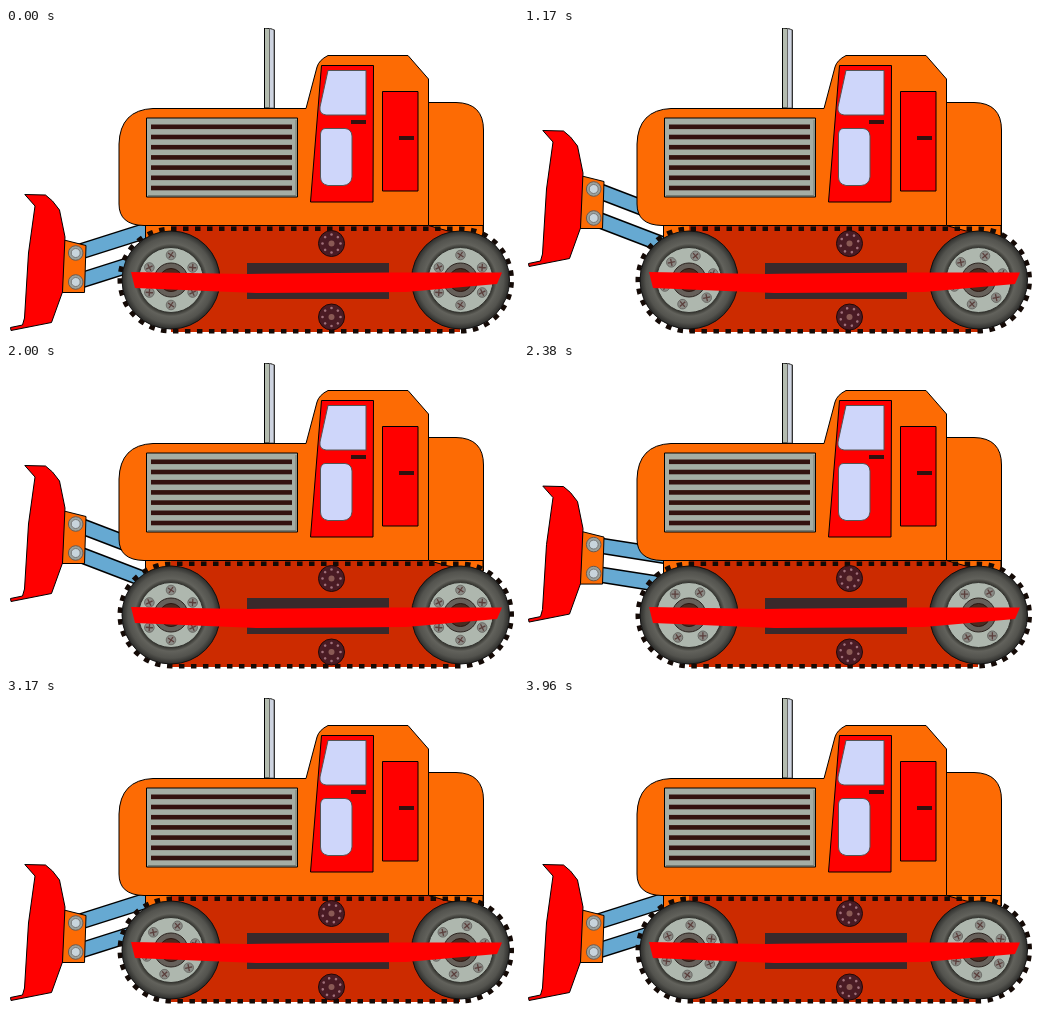
Write an HTML page that moves like this. It is 512x307 px and loops after 4000 ms.

```html
<!DOCTYPE html>
<html lang="en">
<head>
<meta charset="utf-8">
<title>Bulldozer</title>
<style>
  html, body { margin: 0; width: 100%; height: 100%; overflow: hidden; background: #fff; }
  svg { display: block; width: 100%; height: 100%; }
  .line { stroke: #000; stroke-width: 1; }
  .body { fill: #fd6b04; }
  .red { fill: #f00; }
  .glass { fill: #ced6fa; stroke: #555; stroke-width: 1; }
  .dark { fill: #33110f; }
  .arm { stroke: #000; stroke-width: 16.5; }
  .steel { stroke: #66a9d2; stroke-width: 13.5; }
</style>
</head>
<body>
<svg viewBox="0 0 512 307" xmlns="http://www.w3.org/2000/svg">
  <defs>
    <radialGradient id="tyre">
      <stop offset=".66" stop-color="#34342f"/>
      <stop offset=".74" stop-color="#62625c"/>
      <stop offset=".88" stop-color="#53534e"/>
      <stop offset="1" stop-color="#2c2c2a"/>
    </radialGradient>
    <g id="bolt">
      <circle r="4.8" fill="#8b8b86" stroke="#62625e" stroke-width=".8"/>
      <path d="M-3-2L3 2M2-3L-2 3" stroke="#5a3f3c" stroke-width="1.3"/>
    </g>
    <g id="pin">
      <circle r="7.300" fill="#9ba19d" stroke="#6b5a50"/>
      <circle r="4.500" fill="#c8d4dc" stroke="#777"/>
    </g>
    <g id="wheel">
      <circle r="49" fill="url(#tyre)" stroke="#111"/>
      <circle r="32.5" fill="#aeb7ae" stroke="#33332f"/>
      <g class="spin" id="bolts"></g>
      <circle r="17" fill="#66605a" stroke="#2c2420"/>
      <circle r="11.5" fill="#4b2b20" stroke="#2a1712"/>
    </g>
    <g id="roller">
      <circle r="13" fill="#4a1b24" stroke="#220808"/>
      <g class="spin" id="studs"></g>
      <circle r="3" fill="#8a5a55"/>
    </g>
  </defs>

  <g id="arms"></g>

  <g class="line">
    <path fill="#b4bcb0" d="M258.500 0V80H268.500V2L264 .5Z"/>
    <path fill="#cdd3e0" stroke="#666" d="M263.500 .5V80H268V2Z"/>
    <path class="body" d="M139.500 190H170V220H139.500Z"/>
    <path class="body" d="M147 80.500H300L311 39Q313 32 322 27.500H402L422.500 51V74.500H450Q477.500 75 477.500 102V208H440L422 197.500H138Q113 197 113 176V116Q114 82 147 80.500Z"/>
    <path fill="#a5ada4" d="M140.500 90H291.500V169H140.500Z"/>
    <path class="red" d="M315.500 37.500H367.500L367 174H304.500Z"/>
    <path class="red" d="M376.500 63.500H412V163H376.500Z"/>
  </g>
  <path fill="none" stroke="#747b73" d="M142 167.500H290V92"/>
  <g id="slats" class="dark"></g>
  <path class="glass" d="M322 42.500H360V87H320Q313 86 314 79Z"/>
  <path class="glass" d="M319 100.500H339Q345.500 101 346 108V149Q345 157 337 157.500H322Q314.500 156 314.500 149V106Q315 101 319 100.500Z"/>
  <path class="dark" d="M345 92H360V96H345ZM393 108H408V112H393Z"/>

  <path fill="#cc2b00" d="M165 198H454V304H165Z"/>
  <path class="body line" d="M422.500 51V197.500L442 203L477 208V197.500H423"/>
  <path id="teeth" fill="none" stroke="#140a06" stroke-width="4.600" pathLength="900" stroke-dasharray="5.500 6.500" d="M165 200.800H454.500A51.200 51.200 0 0 1 454.500 303.200H165A51.200 51.200 0 0 1 165 200.800Z"/>
  <use href="#roller" x="325.500" y="215.500"/>
  <use href="#roller" x="325.500" y="289"/>
  <path fill="#39292b" d="M241 235H383V271H241Z"/>
  <use href="#wheel" x="165" y="252"/>
  <use href="#wheel" x="454.500" y="252"/>
  <path class="red" d="M125 244L240 246L384 244.500L496 244.500L491 256L400 264L250 265L129 260Z"/>

  <g id="blade">
    <path class="body line" d="M58 212L80 217.500L78.500 264.500H56Z"/>
    <path class="red line" d="M18.800 166.500L39.500 167L46.500 173L53.500 182L59 209L56.500 264L45.500 294.500L5 302.500L4.500 299.500L16.500 297L18.500 290L22.500 225L29 178Z"/>
    <use href="#pin" x="69.700" y="225"/>
    <use href="#pin" x="69.700" y="254"/>
  </g>
</svg>
<script>
  const LOOP = 4000, FRAMES = 96, LIFT = 64;
  const NS = "http://www.w3.org/2000/svg";
  const $ = id => document.getElementById(id);

  function add(parent, tag, attrs) {
    const el = document.createElementNS(NS, tag);
    for (const key in attrs) el.setAttribute(key, attrs[key]);
    return parent.appendChild(el);
  }

  function ring(parent, count, radius, tag, attrs) {
    for (let i = 0; i < count; i++) {
      const transform = `rotate(${i * 360 / count}) translate(0 ${-radius})`;
      add(parent, tag, { ...attrs, transform });
    }
  }

  ring($("bolts"), 6, 25, "use", { href: "#bolt" });
  ring($("studs"), 8, 9, "circle", { r: 1.3, fill: "#a0707a" });
  for (let i = 0; i < 7; i++) {
    add($("slats"), "rect", { x: 145, y: 96.5 + i * 10.2, width: 141, height: 4.6 });
  }

  // Each arm joins a blade pin to a fixed pivot behind the hull.
  const arms = [225, 254].map(pin => ({
    pin,
    lines: ["arm", "steel"].map(name => add($("arms"), "line", {
      class: name, x1: 69.7, x2: 161, y2: pin - 29
    }))
  }));
  const spinners = document.querySelectorAll(".spin");
  const clamp = v => Math.min(1, Math.max(0, v));

  function draw(frame) {
    const up = LIFT * (clamp(frame / 28) - clamp((frame - 48) / 28));
    $("blade").setAttribute("transform", `translate(0 ${-up})`);
    for (const { pin, lines } of arms) {
      for (const line of lines) line.setAttribute("y1", pin - up);
    }
    const turn = frame / FRAMES;
    for (const el of spinners) el.setAttribute("transform", `rotate(${-360 * turn})`);
    $("teeth").setAttribute("stroke-dashoffset", 324 * turn);
  }

  const start = performance.now();
  function tick() {
    const time = (performance.now() - start) % LOOP;
    draw(Math.floor((time + 5) * FRAMES / LOOP) % FRAMES);
    requestAnimationFrame(tick);
  }
  tick();
</script>
</body>
</html>
```
